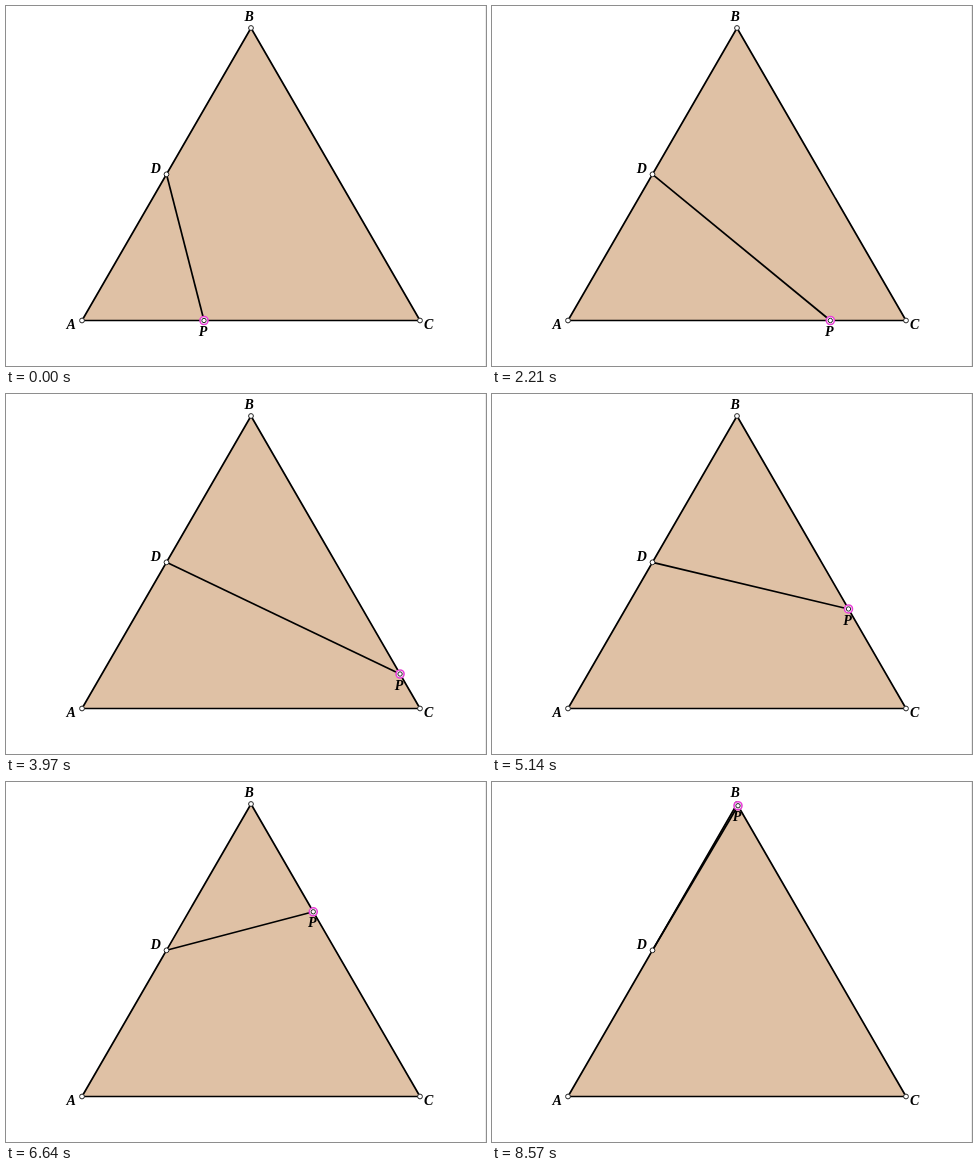
Write an HTML page that moves like this. It is 480 px wide and 360 px high and loops after 8660 ms.

```html
<!DOCTYPE html>
<html lang="en">
<head>
<meta charset="utf-8">
<title>Point moving along a triangle</title>
<style>
  html, body { margin: 0; width: 100%; height: 100%; overflow: hidden; background: #fff; }
  svg { display: block; width: 100vw; height: 100vh; }
  text { font: italic bold 14px "Liberation Serif", "Times New Roman", serif; }
  .line { stroke: #000; stroke-width: 1.7; stroke-linejoin: round; }
  .dot { fill: #fff; stroke: #222; stroke-width: 1; }
</style>
</head>
<body>
<svg viewBox="0 0 480 360">
  <path d="M479.5 0V360" stroke="#ececec"/>
  <path class="line" fill="#dfc1a5" d="M76 314.5L245 22L414 314.5Z"/>
  <path class="line" id="segment"/>
  <circle class="dot" cx="76" cy="314.5" r="2.4"/>
  <circle class="dot" cx="245" cy="22" r="2.4"/>
  <circle class="dot" cx="414" cy="314.5" r="2.4"/>
  <circle class="dot" cx="160.5" cy="168.3" r="2.4"/>
  <text x="60.5" y="323">A</text>
  <text x="238.5" y="15">B</text>
  <text x="418" y="323">C</text>
  <text x="144.7" y="166.5">D</text>
  <g id="point">
    <circle r="4" fill="#fff" stroke="#e83fd8" stroke-width="1.6"/>
    <circle class="dot" r="2.2"/>
    <text x="-5.3" y="15.7">P</text>
  </g>
</svg>
<script>
const LOOP = 8660;
const B = [245, 22], C = [414, 314.5], D = [160.5, 168.3];
const BASE_LENGTH = 216;                       // from the start of the path to C
const SIDE = Math.hypot(C[0] - B[0], C[1] - B[1]);

// Start and end of each run of 11 evenly spaced steps, in ms
const runs = [[80, 890], [990, 1800], [1880, 2690], [2770, 3630], [3710, 4540],
  [4620, 5470], [5550, 6380], [6470, 7280], [7370, 8230]];
const steps = [0];
for (const [from, to] of runs)
  for (let i = 0; i < 11; i++) steps.push(Math.round((from + (to - from) * i / 10) / 10) * 10);
steps.push(8310, 8400, 8480, 8570);

// Time in ms, distance travelled
const travel = [[0, 0], [1390, 87.5], [2210, 141], [3970, 256.5], [5140, 331.6],
  [6640, 430], [8570, 551.8]];

function distanceAt(time) {
  let i = 1;
  while (i < travel.length - 1 && time > travel[i][0]) i++;
  const [t0, d0] = travel[i - 1], [t1, d1] = travel[i];
  return d0 + (d1 - d0) * (time - t0) / (t1 - t0);
}

function pointAt(distance) {
  if (distance < BASE_LENGTH) return [C[0] - BASE_LENGTH + distance, C[1]];
  const k = (distance - BASE_LENGTH) / SIDE;
  return [C[0] + (B[0] - C[0]) * k, C[1] + (B[1] - C[1]) * k];
}

const segment = document.getElementById("segment");
const point = document.getElementById("point");

function draw(time) {
  const stepTime = steps.findLast(step => step <= time);
  const [x, y] = pointAt(distanceAt(stepTime));
  segment.setAttribute("d", `M${D}L${x} ${y}`);
  point.setAttribute("transform", `translate(${x} ${y})`);
}

const start = performance.now();
function tick() {
  draw((performance.now() - start) % LOOP);
  requestAnimationFrame(tick);
}
tick();
</script>
</body>
</html>
```
